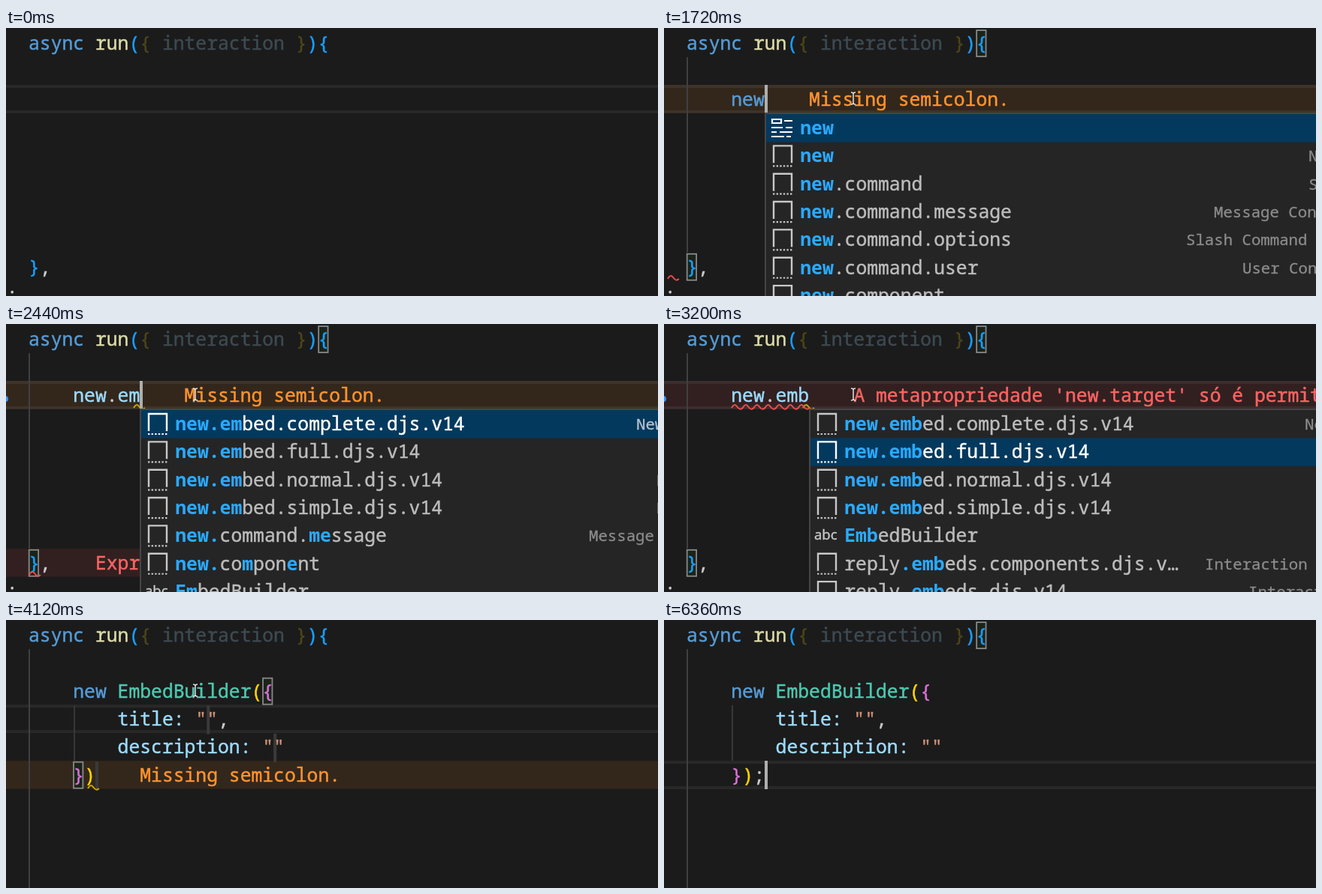
Recreate the animation shown at these times as an HTML page. Size 868 px wide and 358 px high, loop 6440 ms.

```html
<!DOCTYPE html>
<html lang="en">
<head>
<meta charset="utf-8">
<title>Snippet completion</title>
<style>
html, body { margin: 0; width: 100%; height: 100%; overflow: hidden; background: #1b1b1b; }
svg { display: block; width: 868px; height: 358px; }
text { font-family: "Noto Sans Mono", "DejaVu Sans Mono", monospace; font-size: 24.71px; white-space: pre; }
text, tspan { fill: currentColor; stroke: currentColor; stroke-width: .45px; }
.detail { font-size: 20.7px; stroke-width: .3px; }
.abc { font-family: "Open Sans", "Noto Sans", sans-serif; font-size: 18.5px; }
.hit { color: #2aaaff; font-weight: 700; stroke-width: 0; }
</style>
</head>
<body>
<svg id="stage" viewBox="0 0 868 358"></svg>
<script>
const LOOP = 6440, ROW = 37.35, PITCH = 14.826;
const stage = document.getElementById('stage');
const colX = c => 30 + c * PITCH;
const rowY = r => 1.4 + r * ROW;
const baseline = r => rowY(r) + 27.6;

const C = {
  key: '#569cd6', fn: '#dcdcaa', b1: '#179fff', b2: '#ffd700', b3: '#da70d6',
  dimB: '#4b4619', dim: '#3d4a52', type: '#4ec9b0', prop: '#9cdcfe',
  str: '#ce9178', plain: '#cccccc', warn: '#ff942f', error: '#ff6464'
};

// A line is [column, [color, text], ...]
const head = [0, ['key', 'async '], ['fn', 'run'], ['b1', '('], ['dimB', '{ '],
  ['dim', 'interaction'], ['dimB', ' }'], ['b1', '){']];
const tail = { 8: [0, ['b1', '}'], ['plain', ',']], 9: [-2, ['plain', ';']] };
const typing = (color, word, member) => ({
  0: head, ...tail,
  2: [4, [color, word], ...(member == null ? [] : [['plain', '.'], ['prop', member]])]
});
const built = end => ({
  0: head,
  2: [4, ['key', 'new '], ['type', 'EmbedBuilder'], ['b2', '('], ['b3', '{']],
  3: [8, ['prop', 'title: '], ['str', '""'], ['plain', ',']],
  4: [8, ['prop', 'description: '], ['str', '""']],
  5: [4, ['b3', '}'], ['b2', ')'], ['plain', end]]
});

// Suggestions: label with *matched* parts, optional detail and its x
const newList = [['*new*'], ['*new*', 'New', 858], ['*new*.command', 'Slash', 858],
  ['*new*.command.message', 'Message Context', 732],
  ['*new*.command.options', 'Slash Command Options', 695],
  ['*new*.command.user', 'User Context', 770], ['*new*.component']];
const shorter = n => newList.map(([label, ...rest]) =>
  [label.replace('*new*', '*' + 'new'.slice(0, n) + '*' + 'new'.slice(n)), ...rest]);
const dotList = newList.slice(1).map(([label, ...rest]) => [label.replace('*new*.', '*new.*'), ...rest]);
const embeds = (hit, rest, x) => ['complete', 'full', 'normal', 'simple'].map((kind, i) =>
  [`*new.${hit}*${rest}.${kind}.djs.v14`, i === 1 ? '' : 'New', i ? x + 27 : x]);
const eList = [...embeds('e', 'mbed', 824), ['*new.*command.m*e*ssage', 'Message Context', 761],
  ['*new.*compon*e*nt'], ['*E*mbedBuilder']];
const emList = [...embeds('em', 'bed', 839), ['*new.*command.*me*ssage', 'Message Context', 776],
  ['*new.*co*m*pon*e*nt'], ['*Em*bedBuilder']];
const embList = [...embeds('emb', 'ed', 853), ['*Emb*edBuilder'],
  ['reply*.emb*eds.components.djs.v…', 'Interaction', 720], ['reply*.emb*eds.djs.v14', 'Interaction', 778]];

const semicolon = row => [row, 'warn', 'Missing semicolon.'];
const expression = [8, 'error', 'Expression expected.'];
const target = [2, 'error', "A metapropriedade 'new.target' só é permitida no corpo de uma função"];
const outer = [[0, 26], [8, 0]];

// Each step overrides part of the state from its time on
const steps = [
  [0, { lines: { 0: head, ...tail }, row: 2, col: 4, on: 0, boxes: [], lens: [], waves: [],
        list: null, sel: 0, stops: [], guide: 0, inner: 0, bulb: 0 }],
  [720, { on: 1 }],
  [800, { boxes: outer }],
  [840, { guide: 300 }],
  [1240, { on: 0 }],
  [1520, { lines: typing('prop', 'n'), col: 5, on: 1 }],
  [1600, { lines: typing('prop', 'ne'), col: 6, list: shorter(2) }],
  [1680, { lines: typing('key', 'new'), col: 7, list: newList }],
  [1720, { lens: [semicolon(2)], waves: [[5, 333, 1, 'error']] }],
  [1960, { lines: typing('prop', 'new', ''), col: 8, list: dotList }],
  [2040, { lens: [expression], waves: [[31, 333, 1, 'error']] }],
  [2120, { lines: typing('prop', 'new', 'e'), col: 9 }],
  [2200, { list: eList, lens: [semicolon(2), expression],
           waves: [[155, 110, 1, 'warn'], [31, 333, 1, 'error']] }],
  [2440, { lines: typing('prop', 'new', 'em'), col: 10, list: emList, bulb: 1,
           waves: [[170, 110, 1, 'warn'], [31, 333, 1, 'error']] }],
  [2560, { lines: typing('prop', 'new', 'emb'), col: 11, list: embList, lens: [target],
           waves: [[185, 110, 1, 'warn'], [90, 110, 6, 'error']] }],
  [2920, { waves: [[185, 110, 1, 'warn'], [90, 110, 7, 'error']] }],
  [3040, { on: 0 }],
  [3200, { sel: 1 }],
  [3360, { sel: 2 }],
  [3520, { sel: 3, on: 1 }],
  [3640, { lines: built(''), row: 3, col: 16, list: null, lens: [], waves: [], boxes: [],
           guide: 358, inner: 1, bulb: 0, stops: [[3, 16], [4, 22], [5, 6]] }],
  [3760, { boxes: [[2, 21], [5, 4]] }],
  [3920, { lens: [semicolon(5)], waves: [[109, 223, 1, 'warn']] }],
  [4120, { on: 0 }],
  [4240, { row: 4, col: 22, on: 1 }],
  [4440, { row: 5, col: 6, stops: [], boxes: [[2, 20], [5, 5]] }],
  [4640, { lines: built(';'), col: 7, boxes: [] }],
  [4720, { boxes: [[0, 26]] }],
  [4840, { lens: [], waves: [] }],
  [5840, { on: 0 }],
  [6360, { on: 1 }]
];

const rect = (x, y, w, h, fill, extra = '') =>
  `<rect x="${x}" y="${y}" width="${w}" height="${h}" fill="${fill}" ${extra}/>`;
const path = (d, color, width, extra = '') =>
  `<path d="${d}" fill="none" stroke="${color}" stroke-width="${width}" ${extra}/>`;
const text = (x, y, color, body, cls = '') =>
  `<text x="${x}" y="${y}" color="${color}" class="${cls}">${body}</text>`;

function codeLine(r, [col, ...parts]) {
  const body = parts.map(([c, s]) => `<tspan color="${C[c]}">${s}</tspan>`).join('');
  return text(colX(col), baseline(r), C.plain, body);
}

const lineEnd = ([col, ...parts]) => parts.reduce((n, p) => n + p[1].length, col);

function wave([x, y, n, kind]) {
  let d = `M${x} ${y + 2}`;
  for (let i = 0; i < n; i++) d += 'q3.7 -7 7.4 -1.5t7.4 1.5';
  return path(d, kind === 'warn' ? '#cca700' : '#f14c4c', 2);
}

function icon(label, x, y, color) {
  if (label.includes('Builder')) return text(x + 6, y + 24, color, 'abc', 'abc');
  return path(`M${x + 11} ${y + 28}V${y + 5}H${x + 35}V${y + 28}`, color, 2.4) +
    path(`M${x + 10} ${y + 32}H${x + 36}`, color, 2.2, 'stroke-dasharray="2.4 2.2"');
}

function keywordIcon(x, y) {
  return path(`M${x + 9} ${y + 7}h12v5h-12zM${x + 25} ${y + 9}h11M${x + 8} ${y + 18}h15m4 0h9` +
    `M${x + 8} ${y + 24}h7m4 0h17M${x + 8} ${y + 30}h17m3 0h6`, '#ffffff', 2.2);
}

function widget(s) {
  const x = Math.floor(colX(s.col) + 1.5), top = 115;
  let out = rect(x, top - 2, 868 - x, 260, '#252526');
  s.list.forEach(([label, detail, dx], i) => {
    const y = top + i * ROW, picked = i === s.sel;
    const color = picked ? '#ffffff' : '#bdbdbd';
    if (picked) out += rect(x, y, 868 - x, ROW, '#04395e');
    out += label === '*new*' && i === 0 && s.list === newList
      ? keywordIcon(x, y) : icon(label, x, y, picked ? color : '#c8c8c8');
    const body = label.split('*').map((p, k) => k % 2 ? `<tspan class="hit">${p}</tspan>` : p).join('');
    out += text(x + 46.3, y + 26.8, color, body);
    if (detail) out += text(dx, y + 25.8, picked ? '#b8c4cf' : '#8c8c8c', detail, 'detail');
  });
  return out + path(`M868 ${top - 1}H${x}V358`, '#454545', 2);
}

function beam([x, y]) {
  return path(`M${x - 3} ${y - 8}q3 0 3 2q0 -2 3 -2M${x} ${y - 6}v12` +
    `M${x - 3} ${y + 8}q3 0 3 -2q0 2 3 2`, '#e4e4e4', 1.5);
}

function draw(s, mouse) {
  let out = rect(0, 0, 868, 358, '#1b1b1b');
  for (const [r, kind] of s.lens)
    out += rect(0, rowY(r), 868, ROW, kind === 'warn' ? '#33271c' : '#322021');
  const y = Math.round(rowY(s.row));
  for (const edge of [y, y + 34]) out += rect(0, edge, 868, 4, '#fff', 'fill-opacity=".06"');
  if (s.guide) out += rect(30, 39, 2, s.guide - 39, '#404040');
  if (s.inner) out += rect(90, 114, 2, 74, '#383838');
  for (const [r, c] of s.stops) out += rect(colX(c), rowY(r) + 1, 4, 38, '#3a3a3a');
  for (const [r, c] of s.boxes)
    out += rect(colX(c) + 0.7, rowY(r) + 1.6, 12.4, 35, '#1a241a', 'stroke="#888" stroke-width="1.8"');
  for (const r in s.lines) out += codeLine(+r, s.lines[r]);
  for (const [r, kind, msg] of s.lens)
    out += text(colX(lineEnd(s.lines[r]) + 4), baseline(r), C[kind], msg);
  out += s.waves.map(wave).join('');
  if (s.bulb) out += `<circle cx="-1" cy="100" r="4" fill="#3794ff"/>`;
  if (s.on) out += rect(Math.round(colX(s.col)), y, 4, 38, '#aeafad');
  if (s.list) out += widget(s);
  if (mouse) out += beam(mouse);
  stage.innerHTML = out;
}

const mix = (a, b, k) => a.map((v, i) => v + (b[i] - v) * k);
function mouseAt(t) {
  const rest = [252, 94];
  if (t < 120 || t >= 5640) return null;
  if (t < 720) {
    const k = Math.floor((t - 120) / 80) / 7;
    return mix([718, 292], rest, 1 - (1 - k) ** 2);
  }
  const k = Math.max(0, Math.floor((t - 5040) / 80)) / 7;
  return mix(rest, [803, 27], Math.min(1, k * k));
}

let last = '';
function frame(now) {
  const t = now % LOOP;
  const past = steps.filter(([at]) => at <= t);
  const mouse = mouseAt(t);
  const key = past.length + '|' + mouse;
  if (key !== last) {
    last = key;
    draw(Object.assign({}, ...past.map(p => p[1])), mouse);
  }
}

const start = performance.now();
function tick() {
  frame(performance.now() - start);
  requestAnimationFrame(tick);
}
tick();
</script>
</body>
</html>
```
